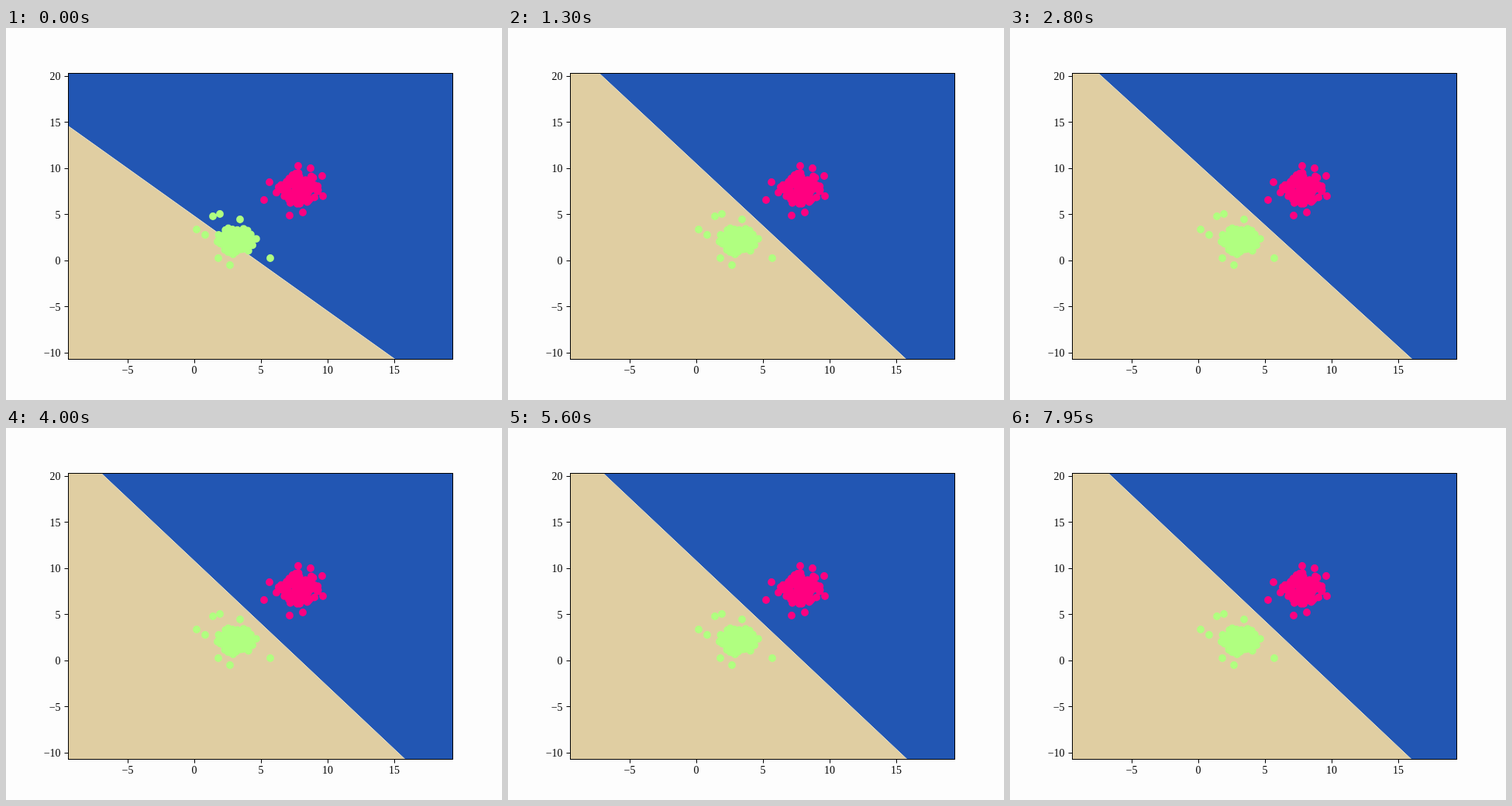
An HTML page with a canvas for the animation above (8000 ms loop, 640 by 480 pixels).

```html
<!DOCTYPE html>
<html lang="en">
<head>
<meta charset="utf-8">
<title>Decision boundary</title>
<style>
  html, body { margin: 0; width: 100%; height: 100%; overflow: hidden; background: #fdfdfd; }
  canvas { display: block; width: 640px; height: 480px; }
</style>
</head>
<body>
<canvas id="stage" width="640" height="480"></canvas>
<script>
const ctx = document.getElementById('stage').getContext('2d');
const LOOP = 8000, STEP = 50;
const LEFT = 80.5, TOP = 58.5, RIGHT = 576.5, BOTTOM = 427.5;
const UNIT_X = 17.2, UNIT_Y = 11.9;
const toX = v => 243 + UNIT_X * v;
const toY = v => 300 - UNIT_Y * v;

// time, where the boundary meets the top and the bottom of the plot
const keys = [
  [0, -15, 502], [700, 157, 511], [1950, 107, 511], [2800, 114, 519],
  [4000, 123, 515], [5600, 123, 515], [7950, 127, 518]
];

function seeded(seed) {
  return () => {
    seed = (seed * 16807) % 2147483647;
    return seed / 2147483647;
  };
}

// Normally distributed points, cut off at a given distance, plus a few outliers
function cluster(cx, cy, spread, limit, seed, outliers) {
  const rand = seeded(seed), points = outliers.slice();
  while (points.length < 100) {
    const r = Math.sqrt(-2 * Math.log(rand())), angle = rand() * Math.PI * 2;
    if (r > limit) continue;
    points.push([
      toX(cx + spread * r * Math.cos(angle)),
      toY(cy + spread * r * Math.sin(angle))
    ]);
  }
  return points;
}

const red = cluster(7.75, 7.8, 0.98, 1.75, 7177, [
  [377, 178], [393, 181], [408, 191], [340, 199],
  [333, 222], [366, 242], [383, 238], [409, 217]
]);
const green = cluster(3.1, 2.1, 0.9, 1.75, 2939, [
  [246, 260], [276, 240], [267, 243], [302, 247],
  [257, 267], [341, 297], [289, 306], [274, 297]
]);

function boundary(t) {
  let i = keys.length - 2;
  while (t < keys[i][0]) i--;
  const [t0, top0, bottom0] = keys[i], [t1, top1, bottom1] = keys[i + 1];
  const u = Math.min(1, (t - t0) / (t1 - t0));
  const ease = u * (2 - u);
  // Training noise, fading as the boundary settles
  const noise = Math.sin(Math.PI * u) * (1.5 + 8 * Math.exp(-t / 900));
  return [
    top0 + (top1 - top0) * ease + noise * Math.sin(t * 0.037),
    bottom0 + (bottom1 - bottom0) * ease + noise * Math.sin(t * 0.029 + 1)
  ];
}

function drawRegions(t) {
  const [top, bottom] = boundary(t);
  ctx.save();
  ctx.beginPath();
  ctx.rect(LEFT, TOP, RIGHT - LEFT, BOTTOM - TOP);
  ctx.clip();
  ctx.fillStyle = '#2256b3';
  ctx.fillRect(LEFT, TOP, RIGHT - LEFT, BOTTOM - TOP);
  ctx.fillStyle = '#e0cea2';
  ctx.beginPath();
  ctx.moveTo(-40, TOP);
  ctx.lineTo(top, TOP);
  ctx.lineTo(bottom, BOTTOM);
  ctx.lineTo(-40, BOTTOM);
  ctx.fill();
  // Thin pale band between the two regions
  ctx.strokeStyle = '#e9e2c8';
  ctx.beginPath();
  ctx.moveTo(top, TOP);
  ctx.lineTo(bottom, BOTTOM);
  ctx.stroke();
  ctx.restore();
}

function drawDots(points, color) {
  ctx.fillStyle = color;
  ctx.beginPath();
  for (const [x, y] of points) {
    ctx.moveTo(x + 4.9, y);
    ctx.arc(x, y, 4.9, 0, Math.PI * 2);
  }
  ctx.fill();
}

function drawAxes() {
  const label = v => String(v).replace('-', '\u2212');
  const snap = p => Math.floor(p) + 0.5;
  ctx.strokeStyle = ctx.fillStyle = '#000';
  ctx.font = '13.9px "Liberation Serif", serif';
  ctx.strokeRect(LEFT, TOP, RIGHT - LEFT, BOTTOM - TOP);
  ctx.beginPath();
  ctx.textAlign = 'center';
  for (let v = -5; v <= 15; v += 5) {
    const x = toX(v);
    ctx.moveTo(snap(x), BOTTOM);
    ctx.lineTo(snap(x), BOTTOM + 5);
    ctx.fillText(label(v), x, 446);
  }
  ctx.textAlign = 'right';
  for (let v = -10; v <= 20; v += 5) {
    const y = toY(v);
    ctx.moveTo(LEFT - 5, snap(y));
    ctx.lineTo(LEFT, snap(y));
    ctx.fillText(label(v), 70.5, y + 5);
  }
  ctx.stroke();
}

function draw(t) {
  ctx.fillStyle = '#fdfdfd';
  ctx.fillRect(0, 0, 640, 480);
  ctx.lineWidth = 1;
  drawRegions(t);
  drawDots(red, '#ff0080');
  drawDots(green, '#b0ff80');
  drawAxes();
}

const start = performance.now();
function tick() {
  const t = (performance.now() - start) % LOOP;
  draw(Math.floor(t / STEP) * STEP);
  requestAnimationFrame(tick);
}
tick();
</script>
</body>
</html>
```
